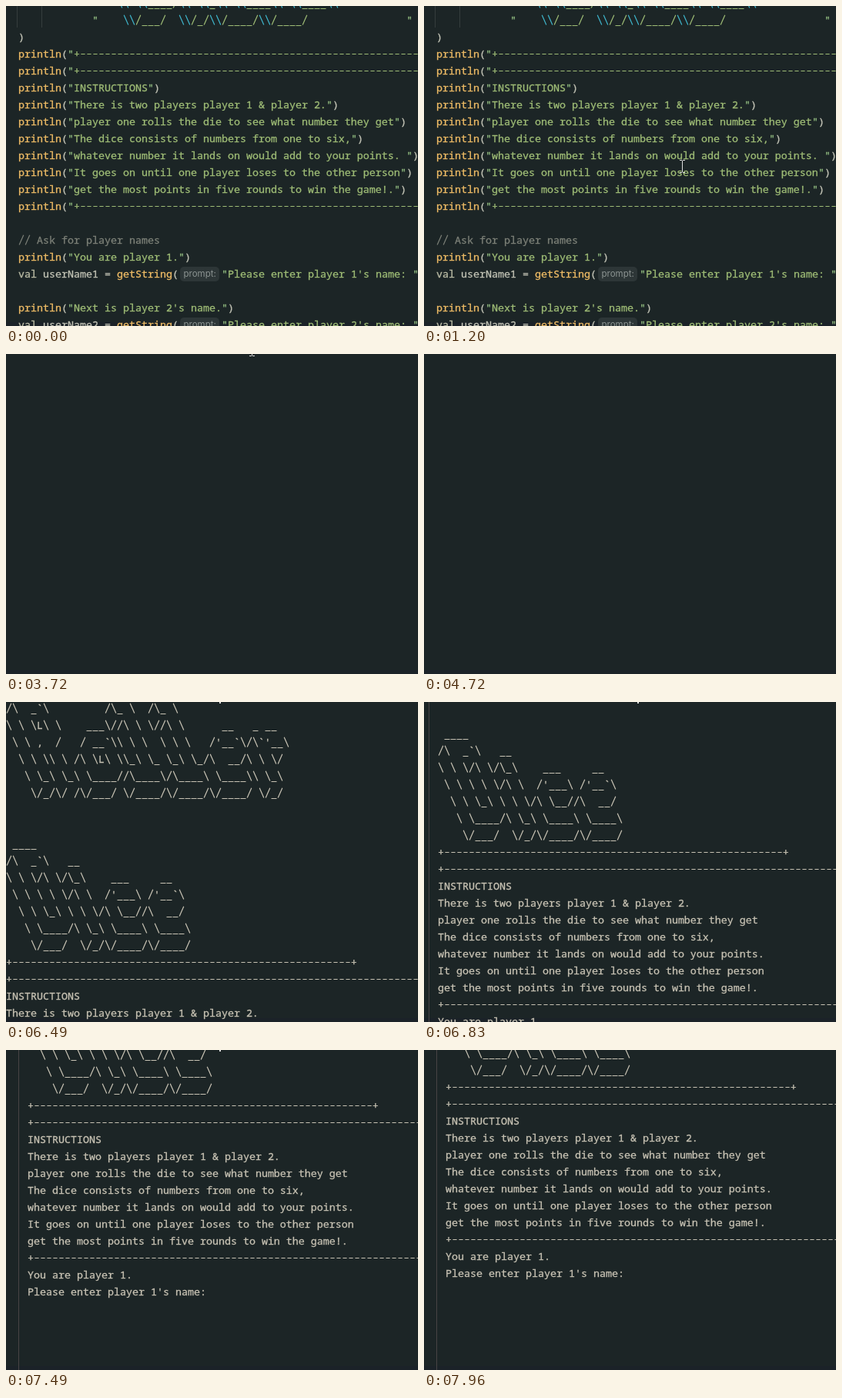
An HTML page with a canvas that plays this animation: 535x416 px, repeating every 8 s.

```html
<!DOCTYPE html>
<html lang="en">
<head>
<meta charset="utf-8">
<title>Dice game</title>
<style>
html, body { margin: 0; width: 535px; height: 416px; overflow: hidden; background: #1c2526; }
canvas { display: block; }
</style>
</head>
<body>
<canvas id="stage" width="535" height="416"></canvas>
<script>
const ctx = document.getElementById('stage').getContext('2d');
const W = 535, H = 416, LOOP = 8000, COL = 8, ROW = 22;
const MONO = '13.3333px "Noto Sans Mono", "DejaVu Sans Mono", monospace';
const color = {
  bg: '#1c2526', edge: '#1b2228', fn: '#f0bd66', plain: '#c3c4b6', string: '#9fbd76',
  quote: '#92bd80', escape: '#3fb6cc', comment: '#7d8178', keyword: '#bcbda6',
  output: '#c8c3b4', guide: '#353d3d', gutter: '#474445', hint: '#2d3637',
  hintText: '#8b9391', pointer: '#dcdcdc'
};

const RULES = [
  'INSTRUCTIONS',
  'There is two players player 1 & player 2.',
  'player one rolls the die to see what number they get',
  'The dice consists of numbers from one to six,',
  'whatever number it lands on would add to your points. ',
  'It goes on until one player loses to the other person',
  'get the most points in five rounds to win the game!.'
];
const RULE_LINE = '+' + '-'.repeat(80);

const OUTPUT = [
  ...String.raw`
 ____            ___    ___
/\  _~\         /\_ \  /\_ \
\ \ \L\ \    ___\//\ \ \//\ \      __   _ __
 \ \ ,  /   / __~\\ \ \  \ \ \   /'__~\/\~'__\
  \ \ \\ \ /\ \L\ \\_\ \_ \_\ \_/\  __/\ \ \/
   \ \_\ \_\ \____//\____\/\____\ \____\\ \_\
    \/_/\/ /\/___/ \/____/\/____/\/____/ \/_/


 ____
/\  _~\   __
\ \ \/\ \/\_\    ___     __
 \ \ \ \ \/\ \  /'___\ /'__~\
  \ \ \_\ \ \ \/\ \__//\  __/
   \ \____/\ \_\ \____\ \____\
    \/___/  \/_/\/____/\/____/`.replace(/~/g, '`').split('\n').slice(1),
  '+' + '-'.repeat(55) + '+',
  RULE_LINE,
  ...RULES,
  RULE_LINE,
  'You are player 1.',
  "Please enter player 1's name:"
];

function rect(x, y, w, h, fill) {
  ctx.fillStyle = fill;
  ctx.fillRect(x, y, w, h);
}

// Tall slashes and rules, as x1, y1, x2, y2 from the cell's baseline
const STROKES = {
  '/': [1.2, 1.5, 6.8, -11.3],
  '\\': [1.2, -11.3, 6.8, 1.5],
  '-': [1.4, -4.5, 6.6, -4.5],
  '_': [0.5, 2.5, 7.5, 2.5]
};

function cells(x, y, text, fill) {
  const letters = text.replace(/[\/\\_-]/g, ' ');
  ctx.fillStyle = ctx.strokeStyle = fill;
  ctx.fillText(letters, x, y);
  ctx.lineWidth = 0.3;
  ctx.strokeText(letters, x, y);
  ctx.lineWidth = 1.2;
  ctx.beginPath();
  [...text].forEach((c, i) => {
    const s = STROKES[c];
    if (!s) return;
    ctx.moveTo(x + i * COL + s[0], y + s[1]);
    ctx.lineTo(x + i * COL + s[2], y + s[3]);
  });
  ctx.stroke();
}

// Draws [text, colour] pairs one after another.
function run(x, y, parts) {
  for (const [text, fill] of parts) {
    cells(x, y, text, fill);
    x += text.length * COL;
  }
}

const quoted = text => [['"', color.quote], [text, color.string], ['"', color.quote]];

function println(y, text) {
  run(16, y, [['println', color.fn], ['(', color.plain], ...quoted(text), [')', color.plain]]);
}

function artRow(y, indent, art) {
  const parts = art.split(/(\\\\)/).map(s => [s, s[0] === '\\' ? color.escape : color.string]);
  run(16 + 12 * COL, y, [['"', color.quote]]);
  run(16 + indent * COL, y, parts);
  run(16 + 63 * COL, y, [['"', color.quote]]);
}

function askName(y, n) {
  run(16, y, [['val', color.keyword], [` userName${n} = `, color.plain],
    ['getString', color.fn], ['(', color.plain]]);
  ctx.fillStyle = color.hint;
  ctx.beginPath();
  ctx.roundRect(226, y - 14, 51, 19, 5);
  ctx.fill();
  ctx.font = '11.5px Inter, "Open Sans", sans-serif';
  ctx.fillStyle = color.hintText;
  ctx.fillText('prompt:', 230.5, y - 1);
  ctx.font = MONO;
  run(280, y, [...quoted(`Please enter player ${n}'s name: `), [')', color.plain]]);
}

function drawEditor() {
  rect(14, 0, 1, 28, color.guide);
  rect(46, 0, 1, 28, color.guide);
  artRow(1, 16, String.raw`\\ \\____/\\ \\_\\ \\____\\ \\____\\`);
  artRow(23, 17, String.raw`\\/___/  \\/_/\\/____/\\/____/`);
  run(16, 45, [[')', color.plain]]);
  [RULE_LINE, RULE_LINE, ...RULES, RULE_LINE].forEach((s, i) => println(67 + i * ROW, s));
  run(16, 309, [['// Ask for player names', color.comment]]);
  println(331, 'You are player 1.');
  askName(353, 1);
  println(397, "Next is player 2's name.");
  askName(419, 2);
}

const clamp = v => Math.min(1, Math.max(0, v));
const smooth = v => v * v * (3 - 2 * v);
const stepped = (t, from, count) => clamp((Math.floor((t - from) / 66.7) + 1) / count);

function drawConsole(t) {
  let x = 0, top = 5;
  if (t >= 6490) {
    const first = smooth(0.1);
    const q = (smooth(stepped(t + 2, 6490, 10)) - first) / (1 - first);
    x = Math.round(28 * q);
    top = Math.round(-9 - 224 * q);
  }
  if (t >= 7430) {
    const p = stepped(t + 8, 7430, 5);
    top -= Math.round(66 * (1 - (1 - p) ** 2));
  }
  rect(x - 12, 0, 1, H, color.gutter);
  OUTPUT.forEach((line, i) => {
    const y = top + i * ROW;
    if (y > -10 && y < H + 14) run(x, y, [[line, color.output]]);
  });
}

// Pointer route: [step, x, y]
const ROUTE = [
  [0, 480, 379], [3, 431, 280], [5, 342, 152], [7, 280, 121], [10, 152, 108],
  [12, 262, 155], [14, 335, 208], [16, 300, 288], [18, 200, 316], [20, 102, 255],
  [22, 112, 165], [24, 185, 119], [27, 300, 150], [29, 342, 220], [31, 285, 288],
  [33, 196, 303], [35, 164, 230], [37, 285, 60], [38, 330, 18], [39, 330, 18],
  [40, 328, 9], [42, 319, -6]
];

function routeAt(k) {
  const last = ROUTE.length - 1;
  if (k >= ROUTE[last][0]) return ROUTE[last].slice(1);
  const i = ROUTE.findIndex(p => p[0] > k) - 1;
  const at = n => ROUTE[Math.min(last, Math.max(0, n))];
  const [a, b, c, d] = [at(i - 1), at(i), at(i + 1), at(i + 2)];
  const u = (k - b[0]) / (c[0] - b[0]);
  return [1, 2].map(n => Math.round(b[n] + 0.5 * u * (c[n] - a[n] +
    u * (2 * a[n] - 5 * b[n] + 4 * c[n] - d[n] + u * (3 * (b[n] - c[n]) + d[n] - a[n])))));
}

function beam(x, y) {
  rect(x, y - 7, 1, 15, color.pointer);
  for (const dy of [-8, 8]) {
    rect(x - 3, y + dy, 3, 1, color.pointer);
    rect(x + 1, y + dy, 3, 1, color.pointer);
  }
}

function drawPointer(t) {
  if (t >= 260 && t < 4520) {
    beam(...routeAt(Math.floor((t - 258) / 66.9)));
  } else if (t >= 4520 && t < 4718) {
    beam(Math.round(319 - 50 * stepped(t, 4520, 3)), -6);
  } else if (t >= 6120 && t < 7890) {
    rect(277, 0, 2, 2, color.pointer);
  } else if (t >= 7890 && t < 7960) {
    rect(273, 0, 2, 1, color.pointer);
  }
}

function draw(t) {
  rect(0, 0, W, H, color.bg);
  rect(0, 411, W, 5, color.edge);
  ctx.font = MONO;
  if (t < 3580) drawEditor();
  else if (t >= 5860) drawConsole(t);
  drawPointer(t);
}

const start = performance.now();
function tick() {
  draw((performance.now() - start) % LOOP);
  requestAnimationFrame(tick);
}
tick();
</script>
</body>
</html>
```
